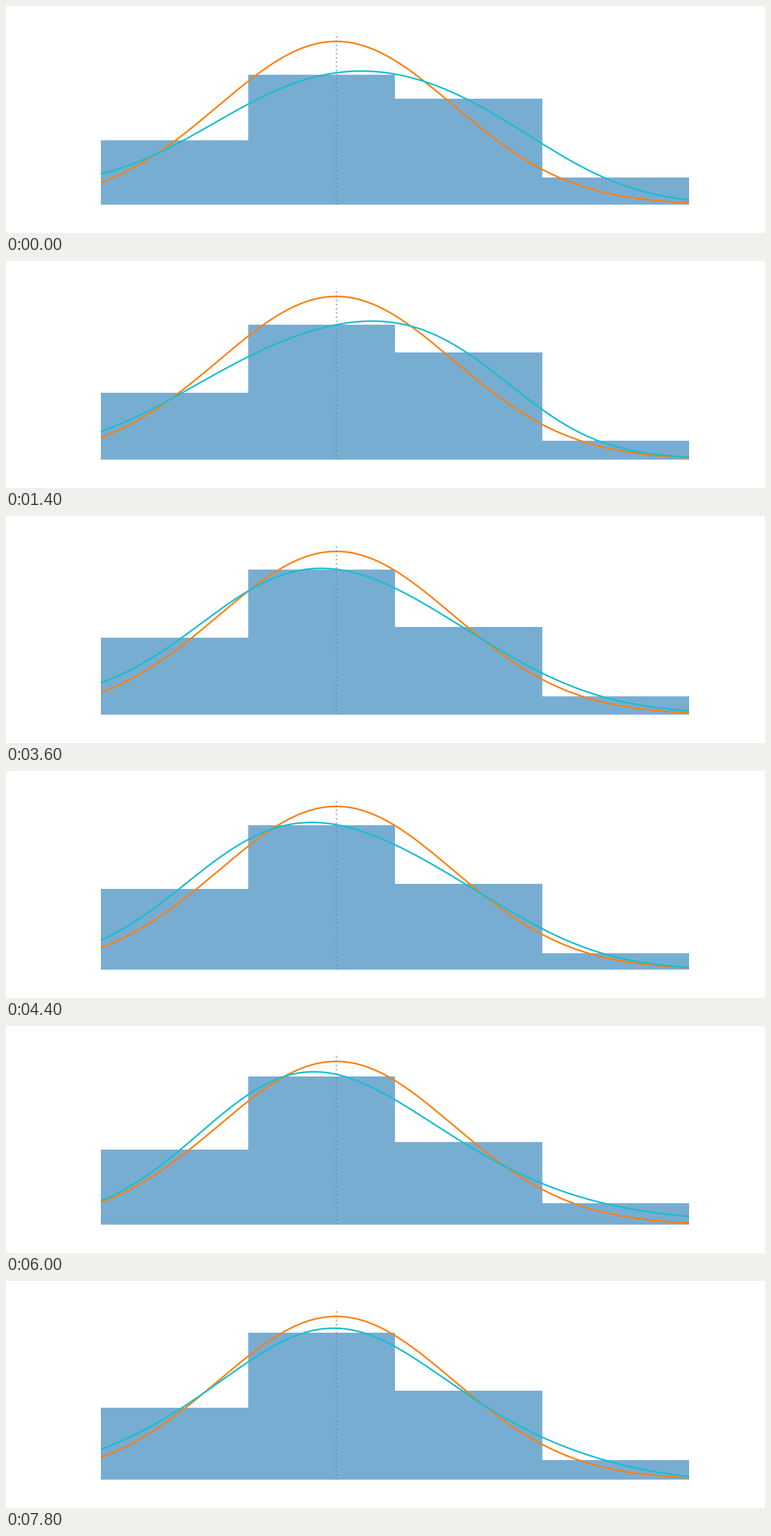
These frames come from a looping animation (1200 px wide and 360 px high, 8 s). A matplotlib script:

```python
import numpy as np
import matplotlib.pyplot as plt
from matplotlib.animation import FuncAnimation

FRAMES, STEP_MS = 40, 200
LW = 1.8
TOP = 1.05 / np.sqrt(2 * np.pi)      # y limit: normal peak plus 5 %
PX = TOP / 271.8                     # density per pixel of axes height

# Key poses of the density curve: time, then its height in pixels
# at seven even steps across the axis.
POSES = {
    0: [49, 115.5, 194, 207, 144.5, 52.5, 7.5],
    1400: [44.5, 121, 196.5, 217, 139.5, 34.5, 4],
    2400: [52, 132, 210, 187, 117.5, 47, 13.5],
    3600: [50.5, 142, 228, 200.5, 109, 34, 6],
    4400: [46.5, 153, 232, 198, 109, 31.5, 3.7],
    6000: [38, 144, 240, 198, 102.5, 39, 13],
    7800: [48, 132, 229, 211, 109, 37.5, 5],
}
times = list(POSES)
log_heights = np.log(np.array(list(POSES.values())) * PX)

knots = np.linspace(-2, 3, 7)
edges = np.linspace(-2, 3, 5)
xs = np.linspace(-2, 3, 401)

# Polynomial through the knots, sampled at xs
fit = np.vander(xs, 7) @ np.linalg.inv(np.vander(knots, 7))


def curve_at(t):
    """Exponential of a polynomial, like a bent normal density."""
    return np.exp(fit @ [np.interp(t, times, col) for col in log_heights.T])


def bars_of(curve):
    """Mean density per bin, scaled to a total area of one."""
    means = ((curve[1:] + curve[:-1]) / 2).reshape(4, -1).mean(axis=1)
    return means / (means.sum() * (edges[1] - edges[0]))


fig = plt.figure(figsize=(12, 3.6), dpi=100, facecolor="white")
ax = fig.add_axes([0.125, 0.125, 0.775, 0.755])
ax.set(xlim=(-2, 3), ylim=(0, TOP))
ax.axis("off")

hist = ax.stairs(np.zeros(4), edges, fill=True, color="tab:blue",
                 alpha=0.6, linewidth=0)
ax.plot(xs, np.exp(-xs ** 2 / 2) / np.sqrt(2 * np.pi),
        color="tab:orange", lw=LW)
ax.axvline(0, color="slategray", ls=":", lw=LW, alpha=0.6)
density, = ax.plot([], [], color="tab:cyan", lw=LW)


def draw(i):
    curve = curve_at(i * STEP_MS)
    hist.set_data(bars_of(curve))
    density.set_data(xs, curve)
    return hist, density


anim = FuncAnimation(fig, draw, frames=FRAMES, interval=STEP_MS,
                     init_func=lambda: draw(0), repeat=True, repeat_delay=0)
plt.show()
```
